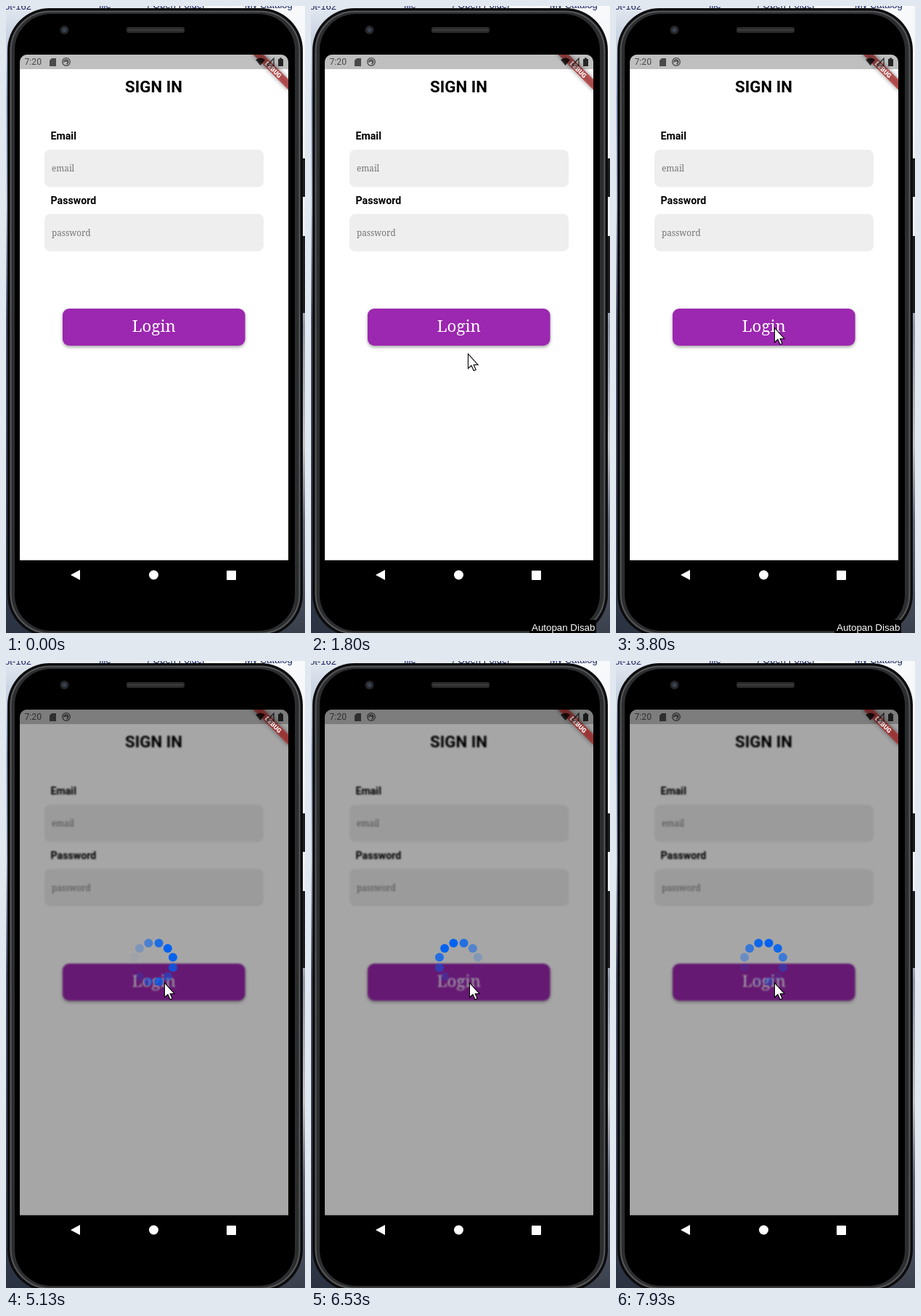
Animation of 412 by 864 pixels, one loop 8000 ms. Source, as an HTML page:

```html
<!DOCTYPE html>
<html lang="en">
<head>
<meta charset="utf-8">
<title>Sign in</title>
<style>
  html, body { margin: 0; width: 100%; height: 100%; overflow: hidden; background: #000; }
  svg { display: block; width: 100%; height: 100%; }
  text { font-family: Roboto, sans-serif; }
  .serif { font-family: "Noto Serif", serif; }
  .sans { font-family: "Liberation Sans", sans-serif; }
  .label { font-weight: 700; font-size: 14.2px; }
  .hint { font-size: 11.7px; fill: #757575; }
  .busy #app { filter: blur(1px); }
  #veil { display: none; }
  .busy #veil { display: inline; }
  #button { filter: drop-shadow(0 2px 2px rgba(0, 0, 0, .38)); }
</style>
</head>
<body>
<svg id="stage" viewBox="0 0 412 864">
  <defs>
    <linearGradient id="left" x2="0" y2="1">
      <stop offset="0" stop-color="#e4e9f0"/>
      <stop offset=".15" stop-color="#91a8c8"/>
      <stop offset=".32" stop-color="#b4c2d5"/>
      <stop offset=".5" stop-color="#48536b"/>
      <stop offset="1" stop-color="#2b3342"/>
    </linearGradient>
    <linearGradient id="right" x2="0" y2="1">
      <stop offset="0" stop-color="#f7f9fb"/>
      <stop offset=".42" stop-color="#e9ecf0"/>
      <stop offset=".51" stop-color="#8a91a1"/>
      <stop offset=".7" stop-color="#c0c2c7"/>
      <stop offset=".82" stop-color="#626978"/>
      <stop offset="1" stop-color="#3a3f4c"/>
    </linearGradient>
    <clipPath id="screen"><rect x="19" y="67" width="370" height="720" rx="10"/></clipPath>
    <filter id="soft" x="-30%" y="-150%" width="160%" height="400%"><feGaussianBlur stdDeviation="3"/></filter>
  </defs>

  <!-- desktop -->
  <rect width="206" height="864" fill="url(#left)"/>
  <rect x="206" width="206" height="864" fill="url(#right)"/>
  <g font-size="13" fill="#16205c">
    <text class="sans" x="-2" y="5">ot-162</text>
    <text class="sans" x="128" y="3">file</text>
    <text class="sans" x="195" y="3">/ Open Folder</text>
    <text class="sans" x="329" y="3">My Catalog</text>
  </g>

  <!-- phone body -->
  <path d="M409 210h3v53h-3zM409 317h3v106h-3z" fill="#1c1d1f"/>
  <rect x="2" y="3" width="407" height="866" rx="58" fill="#0c0c0d"/>
  <rect x="6.500" y="7.500" width="398" height="857" rx="54" fill="#2c2d2f" stroke="#57585b" stroke-width="2"/>
  <rect x="12" y="11" width="386" height="850" rx="50"/>
  <rect x="166" y="29" width="80" height="8" rx="3" fill="#2b2b2c"/>
  <path d="M168 33h76" stroke="#3b3b3c" stroke-width="2"/>
  <circle cx="80.500" cy="33" r="6" fill="#252628"/>
  <circle cx="80.500" cy="33" r="3" fill="#3a4150"/>

  <g clip-path="url(#screen)">
    <g id="app">
      <rect y="40" width="412" height="760" fill="#fff"/>
      <text x="203.500" y="119" font-size="22.300" font-weight="700" text-anchor="middle">SIGN IN</text>
      <text class="label" x="61.500" y="184">Email</text>
      <text class="label" x="61.500" y="273">Password</text>
      <g fill="#eee">
        <rect x="53" y="198" width="302" height="51.500" rx="8"/>
        <rect x="53" y="286.500" width="302" height="51.500" rx="8"/>
      </g>
      <text class="serif hint" x="63" y="228">email</text>
      <text class="serif hint" x="63" y="317">password</text>
      <rect id="button" x="78" y="417" width="251.500" height="51" rx="9" fill="#9c27b0"/>
      <text class="serif" x="203.800" y="449" font-size="22.300" fill="#fff" text-anchor="middle">Login</text>
    </g>
    <g id="veil">
      <rect x="19" y="67" width="370" height="700" opacity=".35"/>
      <g id="dots" fill="#0061f2"></g>
    </g>
    <g transform="translate(389 67) rotate(45)">
      <rect x="-36" y="24" width="72" height="10.300" opacity=".45" filter="url(#soft)"/>
      <rect x="-36" y="24" width="72" height="10.300" fill="#b71c1c" opacity=".63"/>
      <text y="32.300" font-size="8.700" font-weight="900" fill="#fff" text-anchor="middle">DEBUG</text>
    </g>

    <!-- status bar, above the app -->
    <rect x="19" y="67" width="370" height="20" opacity=".25"/>
    <g opacity=".62">
      <text x="25.500" y="81" font-size="12.200">7:20</text>
      <path d="M63 72h6v11h-9v-8z"/>
      <circle cx="83" cy="77" r="5.300" fill="none" stroke="#000" stroke-width="1.300"/>
      <path d="M80 78a3 3 0 1 1 3 2M81 76h4v3" fill="none" stroke="#000" stroke-width="1.400"/>
    </g>
    <g opacity=".8">
      <path d="M344 74q6.500-5 13 0l-6.500 8z"/>
      <path d="M360 82h9v-10z" fill="none" stroke="#000" stroke-width="1.200"/>
      <path d="M375 73h2v-1.500h3v1.500h2v10h-7z"/>
    </g>
  </g>

  <!-- navigation bar -->
  <rect x="19" y="763.700" width="370" height="41.300"/>
  <g fill="#fff">
    <path d="M89 784l13-7v14z"/>
    <circle cx="203.500" cy="784" r="6.500"/>
    <rect x="304" y="778" width="13" height="13" rx="1"/>
  </g>

  <g id="notice">
    <rect x="301" y="846" width="92" height="18"/>
    <text class="sans" x="304" y="861" font-size="13.330" fill="#fff">Autopan Disab</text>
  </g>
  <path id="pointer" d="M.5.5v20l4.500-4 3.200 7 3-1.300-3-6.700h5.800z" fill="#fff" stroke="#000" stroke-width="1.100"/>
</svg>
<script>
const LOOP = 8000, FRAME = 1000 / 15;
const NOTICE = 660, ENTER = 930, BUSY = 5130;

// key points: time, then values
const route = [
  [ENTER, 209, 160], [1130, 212, 267], [1470, 207, 455], [1800, 216, 479],
  [2130, 240, 455], [2470, 223, 441], [2800, 213, 447], [3130, 210, 439],
  [3330, 217, 433], [3530, 220, 445], [3800, 218, 443]
];
const turns = [[BUSY, -0.02], [5730, 1.045], [LOOP, 2.9]];

const $ = id => document.getElementById(id);
const stage = $("stage"), pointer = $("pointer"), notice = $("notice");

const dots = Array.from({ length: 12 }, (_, i) => {
  const dot = document.createElementNS(stage.namespaceURI, "circle");
  const angle = (45 + 30 * i) * Math.PI / 180;
  dot.setAttribute("cx", 203.5 + 27.4 * Math.cos(angle));
  dot.setAttribute("cy", 415.3 + 27.4 * Math.sin(angle));
  dot.setAttribute("r", 6);
  return $("dots").appendChild(dot);
});

const show = (el, on) => el.setAttribute("visibility", on ? "visible" : "hidden");

// linear interpolation through key points, held at the end
function along(keys, t) {
  const time = Math.min(t, keys.at(-1)[0]);
  const i = Math.max(1, keys.findIndex(k => k[0] >= time));
  const [a, b] = [keys[i - 1], keys[i]];
  const f = (time - a[0]) / (b[0] - a[0]);
  return a.slice(1).map((v, j) => v + (b[j + 1] - v) * f);
}

function spin(frame) {
  // the spinner repaints on two frames out of three
  const [phase] = along(turns, (frame % 3 ? frame : frame - 1) * FRAME);
  dots.forEach((dot, i) => {
    const lead = i ? (12 - i) / 10 : 0;
    dot.setAttribute("opacity", (Math.sin((phase + lead) * 2 * Math.PI) + 1) / 2);
  });
}

function draw(now) {
  const frame = Math.floor((now % LOOP + 5) / FRAME);
  const t = frame * FRAME;
  const busy = t >= BUSY;
  stage.classList.toggle("busy", busy);
  show(notice, t >= NOTICE && !busy);
  show(pointer, t >= ENTER);
  const [x, y] = along(route, t).map(Math.round);
  pointer.setAttribute("transform", `translate(${x} ${y})`);
  if (busy) spin(frame);
  requestAnimationFrame(draw);
}
draw(performance.now());
</script>
</body>
</html>
```
